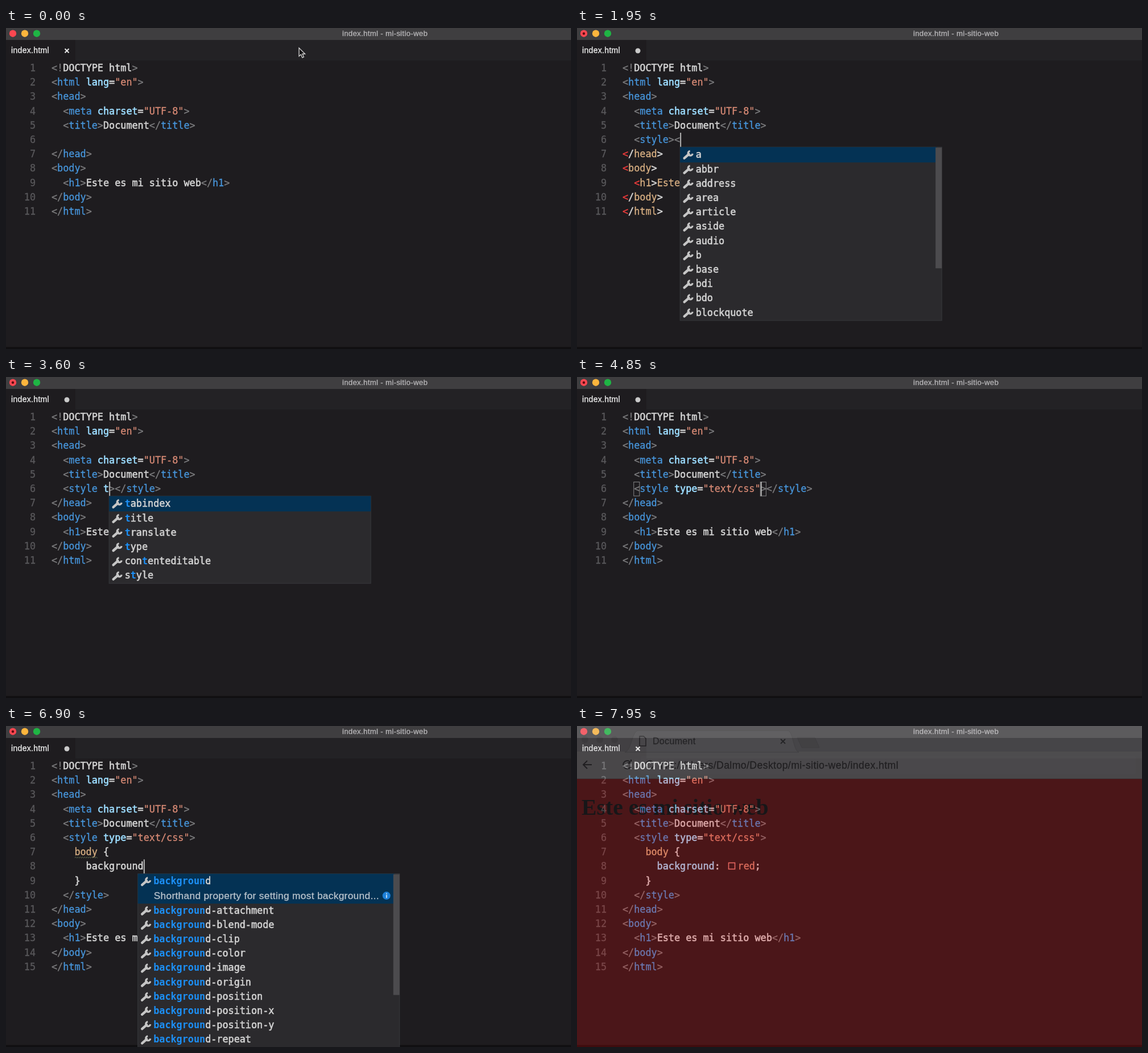
An HTML page that plays this animation: 993 by 564 pixels, repeating every 8 s.

```html
<!DOCTYPE html>
<html lang="es">
<head>
<meta charset="UTF-8">
<title>index.html</title>
<style>
  html, body { margin: 0; width: 100%; height: 100%; overflow: hidden; background: #1e1c1f; }
  svg { display: block; width: 993px; height: 564px; }
  text { white-space: pre; }
  .code { font: 16.8px "DejaVu Sans Mono", monospace; }
  .ui { font-family: "Liberation Sans", Arial, sans-serif; letter-spacing: .32px; }
</style>
</head>
<body>
<svg id="stage" viewBox="0 0 993 564"></svg>
<script>
const LOOP = 8000, FRAME = 50;
const CW = 10.113, LH = 25.2, LEFT = 80, TOP = 58;
const C = { dim: '#7c7c7e', tag: '#4796dc', attr: '#9cdcfe', str: '#d88a75', txt: '#d2d2d2',
  sel: '#d9b083', bad: '#f03c3c', hit: '#1c8ff5' };

const HEAD = ['<!DOCTYPE html>', '<html lang="en">', '<head>', '  <meta charset="UTF-8">', '  <title>Document</title>'];
const FOOT = ['</head>', '<body>', '  <h1>Este es mi sitio web</h1>', '</body>', '</html>'];

const words = s => s.split(' ');
const TAGS = words('a abbr address area article aside audio b base bdi bdo blockquote');
const S_TAGS = words('s samp script section select small source span strong style sub summary sup');
const ATTRS = words('accesskey class contenteditable dir dropzone hidden id lang media spellcheck style tabindex title translate type');
const SELECTORS = words('b base bdi bdo blockquote body br button abbr embed label table');
const PROPS = ['background', ...words('attachment blend-mode clip color image origin position position-x position-y repeat size')
  .map(s => 'background-' + s)];
const VALUES = words('red repeat repeat-x repeat-y rebeccapurple rosybrown royalblue rgb rgba radial-gradient');
const DOCS = {
  a: 'If the a element has an href attribute, then it...',
  s: 'The s element represents contents that are no...',
  strong: 'The strong element represents strong importan...',
  style: 'The style element allows authors to embed style...',
  background: 'Shorthand property for setting most background...'
};

// Editing session
const steps = [{ t: 0, mid: ['  '], row: 0, col: 2, caret: false, saved: true, bad: 9 }];
const last = () => steps[steps.length - 1];
const at = (t, change) => steps.push({ ...last(), t, pop: null, box: null, ...change });

function ins(t, s, change) {
  const p = last(), mid = [...p.mid], line = mid[p.row];
  mid[p.row] = line.slice(0, p.col) + s + line.slice(p.col);
  at(t, { mid, col: p.col + s.length, saved: false, ...change });
}
function popup(list, match, col, opt = {}) {
  const items = list.filter(w => w.includes(match))
    .sort((a, b) => b.startsWith(match) - a.startsWith(match)).slice(0, opt.rows || 12);
  return items.length ? { items, match, col, ...opt } : null;
}
function type(t, dt, word, list, opt = {}) {
  const lag = opt.lag || 0;
  [...word].forEach((ch, i) => {
    const n = Math.max(1, i + 1 - lag);
    ins(t + dt * i, ch, { pop: list && popup(list, word.slice(0, n), last().col + 1 - (i ? lag : 0), opt) });
  });
}

at(650, { caret: true });
ins(900, '<', { white: true, pop: popup(TAGS, '', 3, { doc: true }) });
type(1000, 50, 'sty', S_TAGS, { doc: true });
type(1250, 100, 'le', null);
last().pop = popup(S_TAGS, 'style', 8, { doc: true });
ins(1600, '>', { white: false, bad: 0 });
ins(1850, '<', { pop: popup(TAGS, '', 10) });
ins(2000, '/');
type(2100, 100, 'style', ['style'], { plain: true, dx: 3 });
ins(2550, '>', { bad: 4, pop: popup(['style'], 'style', 16, { plain: true, dx: 3 }) });
at(2650, { bad: 9, pop: last().pop });
for (let i = 0; i < 9; i++) at(2800 + i * 50, { col: 16 - i });
ins(3250, ' ', { pop: popup(ATTRS, '', 9, { rows: 11 }) });
type(3550, 100, 'type', ATTRS, { rows: 11 });
ins(4000, '=');
ins(4100, '""', { col: last().col + 1 });
type(4250, 60, 'text/css', null);
at(4800, { col: 24, box: [[0, 2], [0, 24]] });
at(5050, { col: 25, box: [[0, 2], [0, 24]] });
at(5200, { mid: ['  <style type="text/css">', '    ', '  </style>'], row: 1, col: 4 });
type(5400, 100, 'body', SELECTORS, { doc: true });
ins(5950, ' ');
ins(6150, '{}', { col: 10, box: [[1, 9], [1, 10]] });
at(6350, { mid: [last().mid[0], '    body {', '      ', '    }', '  </style>'], row: 2, col: 6 });
type(6450, 50, 'background', PROPS, { doc: true, lag: 1 });
type(7000, 100, ': ', null);
type(7200, 50, 'red', VALUES, { dx: 3 });
ins(7450, ';');
at(7600, { saved: true });
at(7700, { caret: false });

// Drawing helpers
const esc = s => s.replace(/&/g, '&amp;').replace(/</g, '&lt;').replace(/>/g, '&gt;');
const rect = (x, y, w, h, fill, more = '') => `<rect x="${x}" y="${y}" width="${w}" height="${h}" fill="${fill}" ${more}/>`;
const dot = (x, y, r, fill, more = '') => `<circle cx="${x}" cy="${y}" r="${r}" fill="${fill}" ${more}/>`;
const path = (d, stroke, w, more = 'fill="none"') => `<path d="${d}" stroke="${stroke}" stroke-width="${w}" ${more}/>`;
const label = (x, y, size, fill, s, more = '') =>
  `<text class="ui" x="${x}" y="${y}" font-size="${size}" fill="${fill}" stroke="${fill}" stroke-width=".3" ${more}>${esc(s)}</text>`;
const span = (s, fill) => {
  const weight = fill === C.txt || fill === C.attr ? .6 : .3;
  return `<tspan fill="${fill}" stroke="${fill}" stroke-width="${weight}">${esc(s)}</tspan>`;
};
const code = (x, y, spans, more = '') => `<text class="code" x="${x}" y="${y}" ${more}>${spans}</text>`;
const colX = col => LEFT + col * CW;
const rowY = row => TOP + row * LH;

function paintHtml(line) {
  let inTag = false, first = false, doctype = false;
  return line.match(/<!|<\/?|>|"[^"]*"?|[\w-]+|[^<>"\w]+/g).map(s => {
    if (s[0] === '<') { inTag = first = true; doctype = s === '<!'; return span(s, C.dim); }
    if (s === '>') { inTag = false; return span(s, C.dim); }
    if (!inTag || doctype) return span(s, C.txt);
    if (s[0] === '"') return span(s, C.str);
    if (!/\w/.test(s)) return span(s, C.txt);
    const fill = first ? C.tag : C.attr;
    first = false;
    return span(s, fill);
  }).join('');
}
const paintBroken = line => line.match(/<|\w+|[^<\w]+/g)
  .map(s => span(s, s === '<' ? C.bad : /\w/.test(s) ? C.sel : C.txt)).join('');

function paintCss(line) {
  const [, pad, word, rest] = line.match(/^(\s*)([\w-]*)(.*)$/);
  const fill = word.startsWith('background') ? (rest ? C.attr : C.txt) : C.sel;
  const tail = rest.split(/(\w+)/).map(s => span(s, /\w/.test(s) ? C.str : C.txt)).join('');
  return span(pad + word, fill) + tail;
}

function drawCode(s) {
  const lines = [...HEAD, ...s.mid, ...FOOT], footAt = 5 + s.mid.length;
  let out = '';
  lines.forEach((line, i) => {
    const y = rowY(i) + 18, foot = i - footAt;
    out += code(52, y, span(String(i + 1), '#59585b'), 'text-anchor="end"');
    if (!line.trim()) return;
    if (foot === 0 && s.white) out += code(LEFT, y, span(line, C.txt));
    else if (foot >= s.bad) out += code(LEFT, y, paintBroken(line));
    else if (i > 5 && foot < 0 && !line.includes('<')) {
      const cut = line.indexOf('red');
      if (cut < 0) out += code(LEFT, y, paintCss(line));
      else out += code(LEFT, y, paintCss(line.slice(0, cut)))
        + rect(266.5, y - 12, 11, 11, 'none', 'stroke="#e08078" stroke-width="1.6"')
        + code(colX(cut) + 20.5, y, span('red', C.str) + span(line.slice(cut + 3), C.txt));
    } else out += code(LEFT, y, paintHtml(line));
  });
  if (s.mid.length === 5 && !s.mid[2].includes(':')) {
    let d = 'M121 232';
    for (let i = 0; i < 10; i++) d += 'q1 -3 2 -1.5t2 1.5';
    out += path(d, '#5f6b50', .9);
  }
  for (const [r, c] of s.box || [])
    out += rect(colX(c) - .5, rowY(5 + r) + .5, CW, 24.5, 'none', 'stroke="#858587"');
  if (s.caret) {
    const shift = s.mid[s.row].includes('red') ? 20.5 : 0;
    out += rect(colX(s.col) + shift, rowY(5 + s.row), 2, 25.2, '#b4b4b4');
  }
  return out;
}

const wrench = (x, y) => path(`M${x - 6} ${y + 6}L${x + 2} ${y - 1}`, '#c6c6c6', 4.4, 'stroke-linecap="round"')
  + path(`M${x + 4} ${y - 6.5}A4 4 0 1 0 ${x + 8.5} ${y - 2}`, '#c6c6c6', 3.2);
const textIcon = (x, y) => rect(x - 8, y - 7, 8, 4, 'none', 'stroke="#b9b9b9" stroke-width="1.5"')
  + path(`M${x + 3} ${y - 5}h6M${x - 9} ${y}h10M${x + 4} ${y}h4M${x - 9} ${y + 3.5}h7M${x + 1} ${y + 3.5}h8M${x - 9} ${y + 7}h14`, '#a9a9a9', 1.6);

function drawPopup(s) {
  const { items, match, col, doc, plain, dx = 0 } = s.pop;
  const x = colX(col) + dx, y = rowY(6 + s.row), w = 460;
  const info = doc && DOCS[items[0]], lead = info ? 52 : 26.5;
  const h = lead + (items.length - 1) * LH + 1;
  const long = items.length > 9;
  let out = rect(x, y, w, h, '#2b2a2d', 'stroke="#37393d"')
    + rect(x, y, long ? w - 9 : w, lead + .5, '#043254');
  items.forEach((item, i) => {
    const base = y + 18.5 + (i ? lead - 26 + i * LH + .2 : 0), hit = item.indexOf(match);
    const end = hit + match.length;
    out += (plain ? textIcon : wrench)(x + 13.5, base - 5);
    out += code(x + 27.5, base, span(item.slice(0, hit), C.txt)
      + `<tspan font-weight="bold" fill="${C.hit}">${item.slice(hit, end)}</tspan>` + span(item.slice(end), C.txt));
  });
  if (info) out += label(x + 28, y + 44.4, 17.3, '#b9c3cc', info)
    + dot(x + 437, y + 38.5, 7, '#1c7fd8') + rect(x + 436.2, y + 37, 1.8, 5.5, '#cfe4f7') + rect(x + 436.2, y + 34, 1.8, 1.8, '#cfe4f7');
  if (long) out += rect(x + w - 11, y + 1, 11, Math.min(212, h - 2), '#4c4b4e');
  return out;
}

function drawWindow(s) {
  let out = rect(0, 0, 993, 564, '#1e1c1f') + rect(0, 21, 993, 36, '#232225') + rect(0, 21, 122, 37, '#1e1c1f')
    + rect(0, 0, 993, 21, '#3f3e40') + rect(0, 560.5, 993, 4, '#100f11');
  ['#fc4750', '#fdb53d', '#1fb544'].forEach((fill, i) => out += dot(12 + i * 21, 9.7, 6.2, fill));
  if (!s.saved) out += dot(12, 9.7, 2.2, '#5c0a10');
  out += label(666, 13.7, 13.2, '#b7b6b8', 'index.html - mi-sitio-web', 'text-anchor="middle"');
  out += label(9, 44, 14, '#f0f0f0', 'index.html');
  out += s.saved ? path('M103.5 36.5l7 7m0 -7l-7 7', '#e6e6e6', 2) : dot(107, 40, 4.5, '#c9c9c9');
  return out;
}

function drawMouse(t) {
  if (t >= 900) return '';
  const p = Math.min(1, Math.max(0, (t - 50) / 550)), k = p * p * (3 - 2 * p);
  const x = 515 - 185 * k, y = 35 + 155 * k;
  return path(`M${x} ${y}v14.5l3.4 -3 2.4 5.6 2.6 -1.1 -2.4 -5.5h4.6z`, '#d8d8d8', 1.3, 'fill="#151416"');
}

function drawBrowser(alpha) {
  const ink = '#2c2c2c';
  return `<g opacity="${alpha}">` + rect(0, 0, 993, 46, '#d2d0d2') + rect(0, 45, 993, 48, '#f2f2f2')
    + path('M84 46C96 44 96 8 108 8H370C380 8 380 44 390 46Z', '#b5b5b5', 1, 'fill="#eaeaea"')
    + path('M387 20h31l8 18h-31z', '#aaa', 1, 'fill="#bdbbbd"')
    + [14, 40, 66].map(x => dot(x, 24, 6, '#b4b4b4')).join('')
    + path('M110 18h7l4 4v13h-11z', ink, 1.5) + label(133, 32, 16, ink, 'Document')
    + path('M358 23l8 8m0 -8l-8 8', ink, 1.8)
    + path('M26 68H11m7 -7l-7 7 7 7', ink, 2) + path('M94 64a7 7 0 1 0 0 8M95 59v6h-6', ink, 2)
    + rect(112, 53, 870, 32, '#f8f8f8', 'rx="3"') + dot(128, 68, 7, 'none', `stroke="${ink}" stroke-width="1.6"`)
    + label(565, 74.5, 17.6, ink, 'file:///Users/Dalmo/Desktop/mi-sitio-web/index.html', 'text-anchor="end" style="letter-spacing:.43px"')
    + rect(0, 92, 993, 1, '#b5b5b5') + rect(0, 93, 993, 471, '#fe0000')
    + '<text x="8" y="156" font-family="Liberation Serif, Times, serif" font-weight="bold" font-size="39.7">Este es mi sitio web</text></g>';
}

const stage = document.getElementById('stage');
let shown = -1;
function render(now) {
  const t = Math.floor(now % LOOP / FRAME) * FRAME;
  if (t !== shown) {
    shown = t;
    const s = steps.filter(p => p.t <= t).pop();
    const fade = Math.max(0, (t - 7850) / 500);
    stage.innerHTML = drawWindow(s) + drawCode(s) + (s.pop ? drawPopup(s) : '') + drawMouse(t) + (fade ? drawBrowser(fade) : '');
  }
}
const start = performance.now();
function tick() {
  render(performance.now() - start);
  requestAnimationFrame(tick);
}
tick();
</script>
</body>
</html>
```
